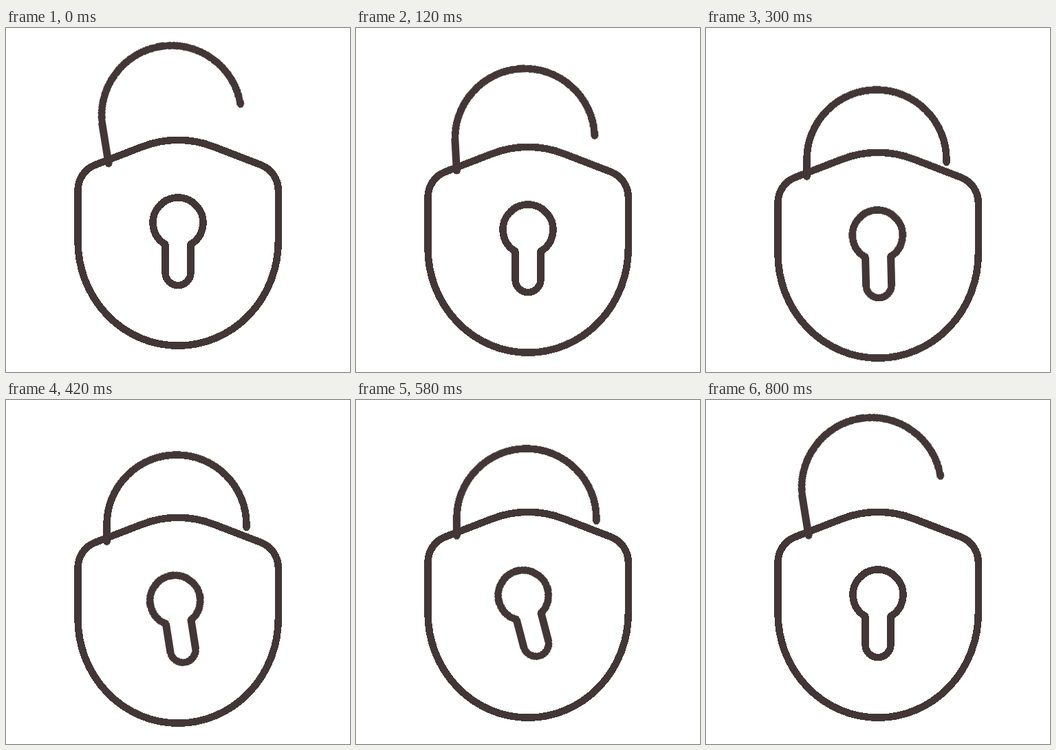
An HTML page without scripts for the animation above (900 ms loop, 500 by 500 pixels).

```html
<!DOCTYPE html>
<html lang="en">
<head>
<meta charset="utf-8">
<title>Padlock</title>
<style>
  html, body { margin: 0; width: 100%; height: 100%; overflow: hidden; background: #fff; }
  svg { display: block; width: 100vw; height: 100vh; }
  path {
    fill: none;
    stroke: #423637;
    stroke-width: 10.5;
    stroke-linecap: round;
    stroke-linejoin: round;
    shape-rendering: crispEdges;
  }

  .lock, .lift, .tilt, .shackle, .keyhole {
    animation: 900ms cubic-bezier(.333, 0, .667, 1) infinite;
  }
  .lock { animation-name: bob; }
  .lift { animation-name: lift; }
  .tilt { animation-name: tilt; }
  .shackle { animation-name: legs; }
  .keyhole { animation-name: turn; transform-origin: 250px 310px; }

  @keyframes bob {
    0%, 62.222%, 100% { transform: translateY(0); }
    26.667% { transform: translateY(20px); }
  }
  @keyframes lift {
    0%, 88.889%, 100% { transform: translateY(-46.2px); }
    26.667%, 62.222% { transform: translateY(0); }
  }
  @keyframes tilt {
    0%, 88.889%, 100% { transform: translateX(-7.4px) rotate(-9.2deg); }
    22.222%, 62.222% { transform: translateX(0) rotate(0deg); }
  }
  /* The left leg shortens as the shackle sinks, so its foot stays on the body. */
  @keyframes legs {
    0% {
      d: path("M-101.5 54.5V0A101.5 101.5 0 0 1 101.5 0V-.5");
      animation-timing-function: cubic-bezier(.38, 0, .75, 1);
    }
    26.667%, 62.222% { d: path("M-101.5 24.5V0A101.5 101.5 0 0 1 101.5 0V4"); }
    88.889%, 100% { d: path("M-101.5 54.5V0A101.5 101.5 0 0 1 101.5 0V-.5"); }
  }
  @keyframes turn {
    0%, 26.667%, 88.889%, 100% { transform: rotate(0deg); }
    62.222% { transform: rotate(-15deg); }
  }
</style>
</head>
<body>
<svg viewBox="0 0 500 500">
  <g class="lock">
    <g transform="translate(248 173.2)">
      <g class="lift">
        <g class="tilt">
          <path class="shackle" d="M-101.5 54.5V0A101.5 101.5 0 0 1 101.5 0V-.5"/>
        </g>
      </g>
    </g>
    <path d="M104.5 236A39.5 39.5 0 0 1 129.7 199L198 172.6A143 143 0 0 1 302 172.6L370.5 199A39.5 39.5 0 0 1 395.8 236V310A145.65 151.8 0 0 1 104.5 310Z"/>
    <path class="keyhole" d="M231.5 314.5A36.5 36.5 0 1 1 268.5 314.5V355.5A18.5 18.5 0 0 1 231.5 355.5Z"/>
  </g>
</svg>
</body>
</html>
```
